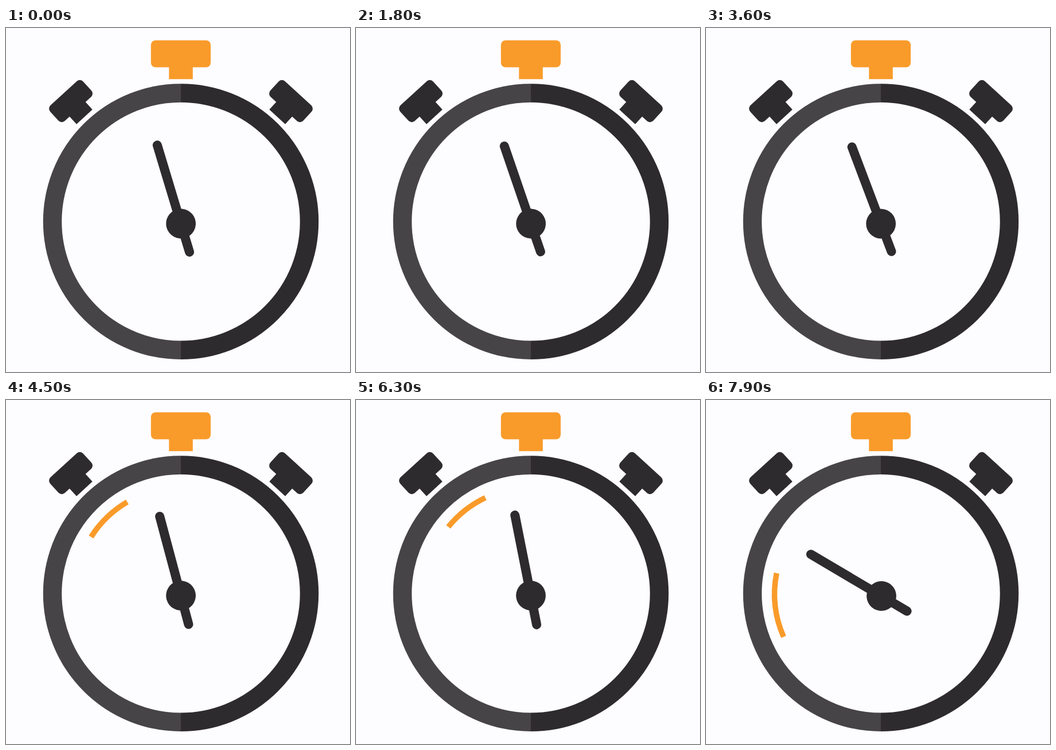
These frames come from a looping animation (600 by 600 pixels, 8000 ms). An HTML page:

```html
<!DOCTYPE html>
<html lang="en">
<head>
<meta charset="utf-8">
<title>Stopwatch</title>
<style>
  html, body { margin: 0; width: 100%; height: 100%; overflow: hidden; background: #fdfcff; }
  svg { display: block; width: 100vw; height: 100vh; }
</style>
</head>
<body>
<svg viewBox="0 0 600 600">
  <defs>
    <g id="knob" transform="translate(113 127.5) rotate(-42.5)" fill="#2e2b2e">
      <rect x="-39" y="-18.5" width="78" height="37" rx="8"/>
      <rect x="-19.8" y="10" width="37.6" height="26.4"/>
    </g>
  </defs>
  <g fill="#f99b2a">
    <rect x="252.8" y="21.5" width="104.2" height="47" rx="8"/>
    <rect x="284.3" y="60" width="41.5" height="29.2"/>
  </g>
  <use href="#knob"/>
  <use href="#knob" transform="translate(610 0) scale(-1 1)"/>
  <g fill="none" stroke-width="32.5">
    <path d="M305 113.4A224 224.2 0 0 0 305 561.8" stroke="#464446"/>
    <path d="M305 113.4A224 224.2 0 0 1 305 561.8" stroke="#2e2b2e"/>
  </g>
  <path id="arc" fill="none" stroke="#f99b2a" stroke-width="9.5"/>
  <g id="hand">
    <path d="M304.9 197.8V392.6" stroke="#2e2b2e" stroke-width="16" stroke-linecap="round"/>
    <circle cx="304.9" cy="340.8" r="25.9" fill="#2e2b2e"/>
  </g>
</svg>
<script>
const LOOP = 8000, STEP = 100, PERIOD = 1780, OFFSET = 260;
const BACK = 22.5; // the hand winds back this far before each turn

// Value at time t of a move between two values, eased by cubic-bezier(x1, 0, x2, 1)
function move(t, start, end, from, to, x1, x2) {
  const u = Math.min(1, Math.max(0, (t - start) / (end - start)));
  let lo = 0, hi = 1;
  for (let i = 0; i < 24; i++) {
    const s = (lo + hi) / 2, r = 1 - s;
    if (3 * r * r * s * x1 + 3 * r * s * s * x2 + s * s * s < u) lo = s; else hi = s;
  }
  return from + (to - from) * lo * lo * (3 - 2 * lo);
}

const handAngle = t => t < 345
  ? move(t, 0, 345, 0, -BACK, 0.565, 0.74)
  : move(t, 345, 1340, -BACK, 360, 0.1, 0.62);
const headAngle = t => move(t, 400, 1400, 0, 360, 0, 0.68);
const tailAngle = t => move(t, 400, 1414, 0, 360, 0, 0.88);

const CX = 305.3, CY = 338.2, R = 185.7;
function point(deg) {
  const a = deg * Math.PI / 180;
  return `${(CX + R * Math.sin(a)).toFixed(2)} ${(CY - R * Math.cos(a)).toFixed(2)}`;
}

const arc = document.getElementById('arc');
const hand = document.getElementById('hand');

function draw(time) {
  const t = Math.floor(time % LOOP / STEP) * STEP;
  const phase = (t + OFFSET) % PERIOD;
  const head = headAngle(phase), tail = tailAngle(phase);
  hand.setAttribute('transform', `rotate(${handAngle(phase).toFixed(2)} 306.4 340.4)`);
  arc.setAttribute('d', head - tail > 0.2
    ? `M${point(tail)}A${R} ${R} 0 0 1 ${point(head)}` : '');
}

const start = performance.now();
function tick() {
  draw(performance.now() - start);
  requestAnimationFrame(tick);
}
tick();
</script>
</body>
</html>
```
